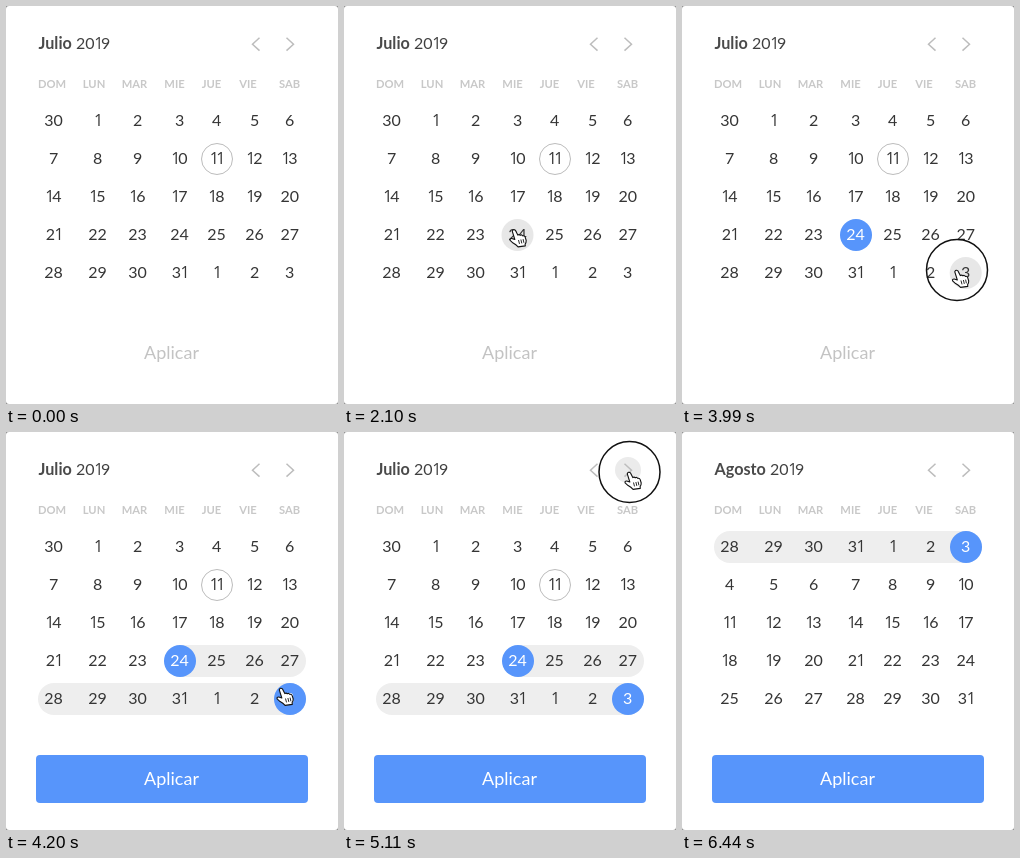
An HTML page with a canvas for the animation above (6.93 s loop, 332 by 398 pixels).

```html
<!DOCTYPE html>
<html lang="es">
<head>
<meta charset="utf-8">
<title>Calendario</title>
<style>
  html, body { margin: 0; width: 100%; height: 100%; overflow: hidden; background: #fff; }
  canvas { display: block; width: 332px; height: 398px; }
</style>
</head>
<body>
<canvas id="stage"></canvas>
<script>
const W = 332, H = 398, LOOP = 6930, STEP = 70;
const canvas = document.getElementById('stage');
const c = canvas.getContext('2d');
const ratio = window.devicePixelRatio || 1;
canvas.width = W * ratio;
canvas.height = H * ratio;

const BLUE = '#5795fb', INK = '#353535', PALE = '#c3c3c3', RANGE = '#eeeeee', HOVER = '#e7e7e7';
const COLS = [47.5, 91.5, 131.5, 173.5, 210.5, 248.5, 283.7];
const ROWS = [115, 153, 191, 229, 267];
const DAYS = [['DOM', 46], ['LUN', 88], ['MAR', 128.5], ['MIE', 168.5], ['JUE', 205.5], ['VIE', 242], ['SAB', 283.5]];

// Pointer stops: time, x, y, easing towards the stop
const linear = p => p;
const easeIn = p => p * p;
const easeOut = p => 1 - (1 - p) * (1 - p);
const smooth = p => p * p * (3 - 2 * p);
const PATH = [
  [70, 199, 365, linear], [280, 189, 147, easeOut],
  [420, 189, 147, linear], [1120, 176, 202, smooth], [1260, 170, 222, easeOut],
  [2030, 170, 222, linear], [2170, 171, 225, linear],
  [2800, 171, 225, linear], [2870, 176.7, 227.5, linear], [3360, 275, 264, smooth],
  [4130, 275, 264, linear], [4410, 283, 136, easeIn], [4760, 285, 58, easeOut], [4900, 285.5, 40, easeOut],
  [5460, 285.5, 40, linear], [6020, 229, 125, smooth],
  [6090, 229, 125, linear], [6370, 194, 291, easeIn]
];
// Click rings: start, end, radius
const RINGS = [[1540, 1750, 22.3], [2310, 2450, 31], [3990, 4130, 30.5], [5110, 5250, 30.5]];

function pointerAt(t) {
  let a = PATH[0];
  for (const b of PATH) {
    if (t < b[0]) {
      const p = b[3](Math.max(0, (t - a[0]) / (b[0] - a[0])));
      return { x: a[1] + (b[1] - a[1]) * p, y: a[2] + (b[2] - a[2]) * p };
    }
    a = b;
  }
  return { x: a[1], y: a[2] };
}

function disc(x, y, r, fill) {
  c.beginPath();
  c.arc(x, y, r, 0, 7);
  c.fillStyle = fill;
  c.fill();
}

function ring(x, y, r, color, width) {
  c.beginPath();
  c.arc(x, y, r, 0, 7);
  c.strokeStyle = color;
  c.lineWidth = width;
  c.stroke();
}

function box(x, y, w, h, r, fill) {
  c.beginPath();
  c.roundRect(x, y, w, h, r);
  c.fillStyle = fill;
  c.fill();
}

function text(str, x, y, size, color, align = 'left', weight = 400) {
  c.font = `${weight} ${size}px Lato, sans-serif`;
  c.textAlign = align;
  c.fillStyle = color;
  c.fillText(str, x, y);
}

// Proportional figures with a narrow, footless one
function figures(str, x, y, color, centered) {
  const advance = d => d === '1' ? 6.5 : 9.25;
  if (centered) x -= [...str].reduce((sum, d) => sum + advance(d), 0) / 2;
  c.textAlign = 'left';
  c.fillStyle = color;
  for (const d of str) {
    const one = d === '1';
    c.font = one ? '16px "Open Sans", sans-serif' : '16px Lato, sans-serif';
    c.fillText(d, one ? x - 0.3 : x, y);
    x += advance(d);
  }
}

function chevron(x, dir) {
  c.beginPath();
  c.moveTo(x - 3.5 * dir, 31.8);
  c.lineTo(x + 3.5 * dir, 38.2);
  c.lineTo(x - 3.5 * dir, 44.6);
  c.strokeStyle = '#bdbdbd';
  c.lineWidth = 1.5;
  c.stroke();
}

const ARROW = new Path2D('M0 0V13.2L3 10.3 5.1 15.1 7.4 14.1 5.4 9.4H9.5Z');
const HAND = new Path2D('M-2.2 1.8Q-1.2-.7 1 .9L3.3 5.6Q4.6 4.4 5.9 5.8 7.3 4.8 8.4 6.4 10 5.8 10.7 7.6L11.7 11Q11.8 13.2 10.6 14.6L10.8 16.4 3.6 17.4Q1.6 15.2-1.4 13.6L-4.4 10.9Q-4.8 8.9-2.8 9L.3 10Z');
const CREASES = new Path2D('M4 10.5L5 14.4M6.4 10L7.3 13.9M8.6 9.6L9.4 13.3');

function drawPointer(p, isHand) {
  c.save();
  c.translate(p.x, p.y);
  c.lineJoin = 'round';
  if (isHand) {
    c.fillStyle = '#fff';
    c.strokeStyle = '#111';
    c.lineWidth = 1.1;
    c.fill(HAND);
    c.stroke(HAND);
    c.lineWidth = 0.9;
    c.stroke(CREASES);
  } else {
    c.strokeStyle = '#fff';
    c.lineWidth = 1.8;
    c.stroke(ARROW);
    c.fillStyle = '#0a0a0a';
    c.fill(ARROW);
  }
  c.restore();
}

function draw(t) {
  const august = t >= 5250;
  const start = t >= 2450 && !august;
  const ranged = t >= 4130;
  const shown = t >= 70 && t < 6440;
  const p = pointerAt(t);
  const near = (x, y, r) => Math.hypot(p.x - x, p.y - y) < r;
  const active = shown && t >= 2100;
  let isHand = active && (near(284, 38, 20) || near(250, 38, 14));

  c.setTransform(ratio, 0, 0, ratio, 0, 0);
  c.fillStyle = '#8a8a8a';
  c.fillRect(0, 0, W, H);
  box(0, 0, W, H, 3, '#fff');

  const month = august ? 'Agosto' : 'Julio';
  text(month, 32.5, 43, 16.2, '#4a4a4a', 'left', 700);
  figures('2019', 32.5 + c.measureText(month).width + 4.3, 43, '#404040');
  if (t >= 5110 && t < 5250) disc(284, 38, 13, '#ebebeb');
  chevron(250, -1);
  chevron(284, 1);
  for (const [name, x] of DAYS) text(name, x, 82, 11.2, '#c8c8c8', 'center', 700);

  if (active) {
    for (const y of ROWS) for (const x of COLS) {
      if (near(x, y, 17.6)) {
        isHand = true;
        disc(x, y, 16, HOVER);
      }
    }
  }

  if (ranged) {
    if (!august) box(174, 213, 126, 32, [0, 16, 16, 0], RANGE);
    const y = august ? 115 : 267;
    box(32, y - 16, 268, 32, 16, RANGE);
    disc(284, y, 16, BLUE);
  }
  if (start) disc(174, 229, 16, BLUE);
  if (!august) ring(211, 153, 15.5, '#bcbcbc', 1);

  ROWS.forEach((y, row) => COLS.forEach((x, col) => {
    const i = row * 7 + col;
    const day = august ? (i + 27) % 31 + 1 : i ? (i - 1) % 31 + 1 : 30;
    const picked = start && i === 24 || ranged && i === (august ? 6 : 34);
    figures(String(day), x, y + 5, picked ? '#fff' : INK, true);
  }));

  if (ranged) box(30, 323, 272, 48, 4, BLUE);
  text('Aplicar', 165.5, 353, 18, ranged ? '#fff' : PALE, 'center');

  for (const [from, to, r] of RINGS) {
    if (t >= from && t < to) ring(p.x, p.y, r, '#111', 1.5);
  }
  if (shown) drawPointer(p, isHand);
}

const origin = performance.now();
function tick() {
  const t = (performance.now() - origin) % LOOP;
  draw(Math.floor(t / STEP) * STEP);
  requestAnimationFrame(tick);
}
tick();
</script>
</body>
</html>
```
